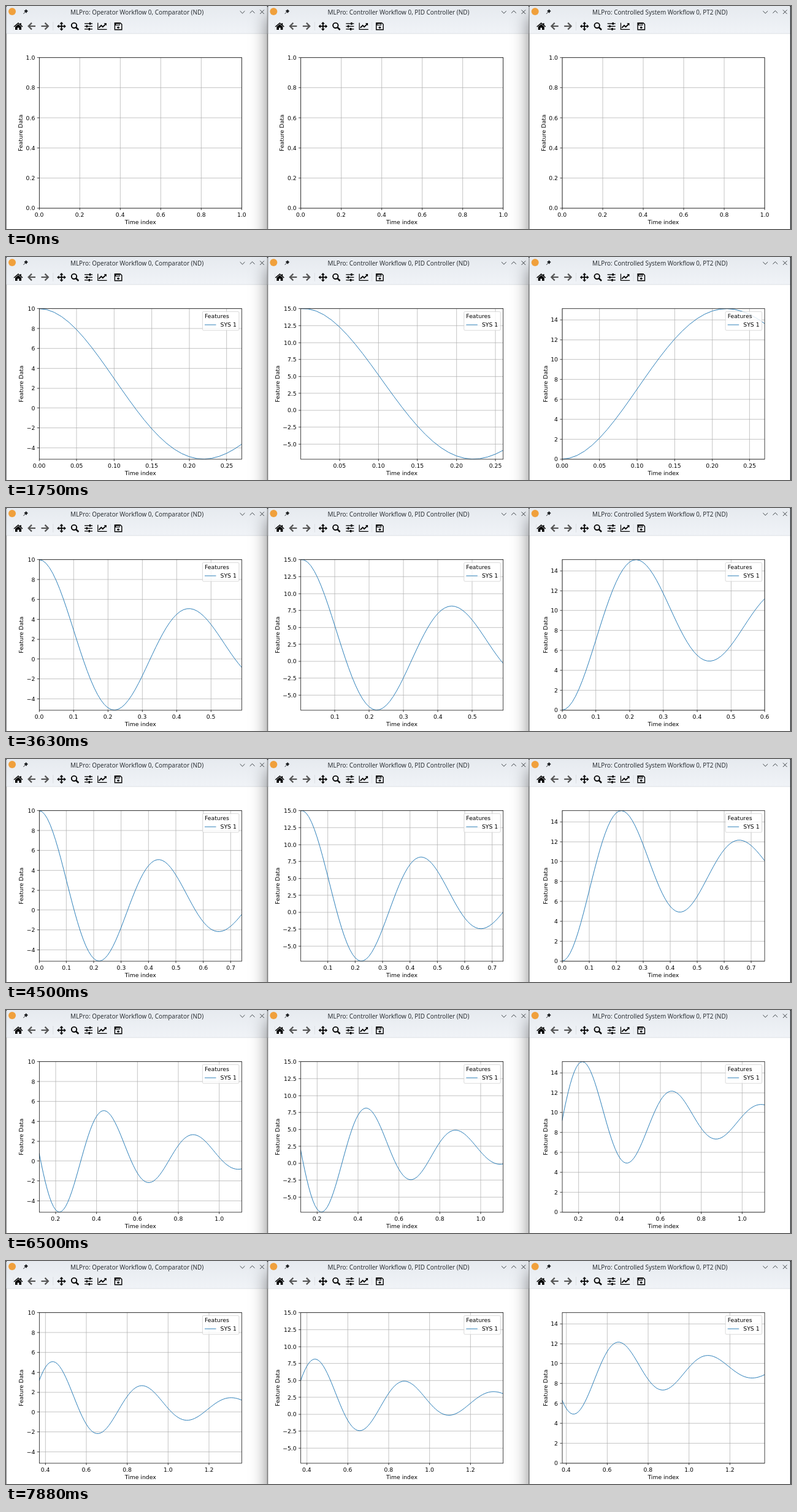
Write an HTML page with a canvas that moves like this. It is 1280 by 365 pixels and loops after 8 s.

```html
<!DOCTYPE html>
<html lang="en">
<head>
<meta charset="utf-8">
<title>Control loop</title>
<style>
  html, body { margin: 0; width: 100%; height: 100%; overflow: hidden; background: #fff; }
  canvas { display: block; }
</style>
</head>
<body>
<canvas id="stage" width="1280" height="365"></canvas>
<script>
const ctx = document.getElementById('stage').getContext('2d');
const LOOP = 8000, STEP = 125, DT = 0.01, WINDOW = 99;
const PITCH = 426.35;
const BOX = { left: 54, right: 384.4, top: 84.6, bottom: 330.7 };
const PLOT_FONT = '9.26px "DejaVu Sans", sans-serif';
const TITLE_FONT = '9.92px "Noto Sans", sans-serif';
const LINE = 0.74;

// Closed loop response: a slow offset plus a damped oscillation.
const HALF = 0.2182, OMEGA = Math.PI / HALF, SIGMA = 1.7, LAMBDA = 0.6416;
const OFFSET = 1.14, SWING = 10 - OFFSET;
const SINE = (LAMBDA * OFFSET + SIGMA * SWING) / OMEGA;

function controlError(t) {
  const wave = SWING * Math.cos(OMEGA * t) + SINE * Math.sin(OMEGA * t);
  return OFFSET * Math.exp(-LAMBDA * t) + Math.exp(-SIGMA * t) * wave;
}

const errors = [], control = [], output = [];
for (let i = 0, sum = 0; i < 150; i++) {
  const e = controlError(i * DT);
  if (i) sum += (e + errors[i - 1]) / 2 * DT;
  errors.push(e);
  control.push(1.5 * e + 1.02 * sum);
  output.push(10 - e);
}

// The three plots refresh one after another within each cycle.
const panels = [
  { title: 'MLPro: Operator Workflow 0, Comparator (ND)', data: errors, lead: 1 / 3, start: 0 },
  { title: 'MLPro: Controller Workflow 0, PID Controller (ND)', data: control, lead: 0, start: 1e-4 },
  { title: 'MLPro: Controlled System Workflow 0, PT2 (ND)', data: output, lead: 2 / 3, start: 0 }
];

// [picture step, sample reached]
const pace = [[1, 0], [2, 1.45], [8, 13.8], [21, 42.15], [36, 74.5], [44, 91.85], [52, 111.15], [63, 136.5]];

function progress(step) {
  const i = Math.max(1, pace.findIndex(p => p[0] >= step));
  const [a, from] = pace[i - 1], [b, to] = pace[i];
  return from + (to - from) * (step - a) / (b - a);
}

const snap = v => (Math.round(v * 1.5 - 0.5) + 0.5) / 1.5;

function path(points, close) {
  ctx.beginPath();
  points.forEach(([x, y], i) => i ? ctx.lineTo(x, y) : ctx.moveTo(x, y));
  if (close) ctx.closePath();
}

function stroke(points, color, width) {
  path(points);
  ctx.strokeStyle = color;
  ctx.lineWidth = width;
  ctx.stroke();
}

function fill(points, color) {
  path(points, true);
  ctx.fillStyle = color;
  ctx.fill();
}

function disc(x, y, r, color) {
  ctx.beginPath();
  ctx.arc(x, y, r, 0, 7);
  ctx.fillStyle = color;
  ctx.fill();
}

function text(str, x, y, align, font = PLOT_FONT, color = '#000') {
  ctx.font = font;
  ctx.textAlign = align;
  ctx.fillStyle = color;
  ctx.fillText(str, x, y);
}

function ticks([lo, hi]) {
  const raw = (hi - lo) / 9;
  const mag = 10 ** Math.floor(Math.log10(raw) + 1e-9);
  const base = [1, 2, 2.5, 5, 10].find(s => s * mag >= raw * (1 - 1e-9));
  const size = base * mag;
  let digits = 0;
  while (digits < 6 && Math.abs(size * 10 ** digits - Math.round(size * 10 ** digits)) > 1e-6) digits++;
  const list = [];
  for (let i = Math.ceil(lo / size - 1e-6); i * size <= hi + size * 1e-6; i++) {
    const value = i * size;
    list.push({ value, label: (value < 0 ? '\u2212' : '') + Math.abs(value).toFixed(digits) });
  }
  return list;
}

function limits(lo, hi) {
  if (hi > lo) return [lo, hi];
  const pad = 0.05 * Math.abs(lo) || 0.05;
  return [lo - pad, hi + pad];
}

function drawLegend() {
  ctx.beginPath();
  ctx.roundRect(320.4, 89.3, 59.5, 30.8, 1.85);
  ctx.fillStyle = 'rgba(255,255,255,.8)';
  ctx.fill();
  ctx.strokeStyle = 'rgba(204,204,204,.8)';
  ctx.lineWidth = 0.93;
  ctx.stroke();
  text('Features', 324, 100.2, 'left');
  stroke([[324, 111], [342.5, 111]], '#1f77b4', 0.93);
  text('SYS 1', 349.6, 114.3, 'left');
}

function drawPlot(panel, count) {
  const { left, right, top, bottom } = BOX;
  const filled = count >= 0;
  const first = Math.max(0, count - WINDOW);
  const seen = panel.data.slice(0, count + 1);
  const xLim = filled ? limits(first * DT + (first ? 0 : count ? panel.start : 0), count * DT) : [0, 1];
  const yLim = filled ? limits(Math.min(...seen), Math.max(...seen)) : [0, 1];
  const toX = v => left + (v - xLim[0]) / (xLim[1] - xLim[0]) * (right - left);
  const toY = v => bottom - (v - yLim[0]) / (yLim[1] - yLim[0]) * (bottom - top);
  const xTicks = ticks(xLim), yTicks = ticks(yLim);

  for (const { value } of xTicks) {
    const x = snap(toX(value));
    stroke([[x, top], [x, bottom]], '#b0b0b0', LINE);
  }
  for (const { value } of yTicks) {
    const y = snap(toY(value));
    stroke([[left, y], [right, y]], '#b0b0b0', LINE);
  }

  if (count > 0) {
    ctx.save();
    ctx.beginPath();
    ctx.rect(left, top, right - left, bottom - top);
    ctx.clip();
    ctx.lineJoin = 'round';
    const curve = seen.map((v, i) => [toX(i * DT), toY(v)]).slice(first);
    stroke(curve, '#1f77b4', 0.93);
    ctx.restore();
  }

  let widest = 0;
  for (const { value, label } of xTicks) {
    const x = snap(toX(value));
    stroke([[x, bottom], [x, bottom + 3.3]], '#000', LINE);
    text(label, toX(value), 344.5, 'center');
  }
  for (const { value, label } of yTicks) {
    const y = snap(toY(value));
    stroke([[left - 3.3, y], [left, y]], '#000', LINE);
    text(label, left - 6.7, toY(value) + 3.5, 'right');
    widest = Math.max(widest, ctx.measureText(label).width);
  }
  const l = snap(left), r = snap(right), t = snap(top), b = snap(bottom);
  ctx.strokeStyle = '#000';
  ctx.lineWidth = LINE;
  ctx.strokeRect(l, t, r - l, b - t);

  text('Time index', (left + right) / 2, 356.7, 'center');
  ctx.save();
  ctx.translate(left - 12.2 - widest, (top + bottom) / 2);
  ctx.rotate(-Math.PI / 2);
  text('Feature Data', 0, 0, 'center');
  ctx.restore();

  if (filled) drawLegend();
}

function drawArrow(x, dir) {
  stroke([[x - 6 * dir, 33], [x + 5 * dir, 33]], '#555', 2.2);
  stroke([[x, 27.6], [x + 5.4 * dir, 33], [x, 38.4]], '#555', 2.2);
}

function drawMoveIcon(x, y) {
  for (let i = 0; i < 4; i++) {
    ctx.save();
    ctx.translate(x, y);
    ctx.rotate(i * Math.PI / 2);
    stroke([[0, 0], [5, 0]], '#000', 1.8);
    fill([[4, -3], [7.3, 0], [4, 3]], '#000');
    ctx.restore();
  }
}

function drawToolbar() {
  for (let y = 28; y < 40; y += 2.7) disc(12, y, 0.5, '#bfc4c9');

  stroke([[13, 34], [20, 28], [27, 34]], '#000', 1.6);
  fill([[15, 34], [20, 29.8], [25, 34], [25, 39], [21.4, 39], [21.4, 35.5], [18.6, 35.5], [18.6, 39], [15, 39]], '#000');
  fill([[23, 28], [24.8, 28], [24.8, 32], [23, 30.5]], '#000');
  drawArrow(42, -1);
  drawArrow(63.5, 1);
  drawMoveIcon(90.5, 33.2);

  ctx.beginPath();
  ctx.arc(111, 31.8, 4.2, 0, 7);
  ctx.strokeStyle = '#000';
  ctx.lineWidth = 1.9;
  ctx.stroke();
  stroke([[114, 34.8], [118.3, 39]], '#000', 2.5);

  [[28.8, 137], [33.3, 131.8], [37.8, 135.8]].forEach(([y, knob]) => {
    stroke([[128, y], [141, y]], '#000', 1.3);
    stroke([[knob, y - 1.9], [knob, y + 1.9]], '#000', 2.4);
  });

  stroke([[149.8, 27.5], [149.8, 38.4], [164.5, 38.4]], '#000', 1.2);
  stroke([[151.5, 35.6], [155.3, 31.8], [157.8, 34.2], [162.3, 29.8]], '#000', 1.8);
  fill([[159.6, 28], [163.8, 28], [163.8, 32.2]], '#000');

  path([[177.4, 27.7], [186.4, 27.7], [188.8, 30.1], [188.8, 38.8], [177.4, 38.8]], true);
  ctx.lineWidth = 1.4;
  ctx.stroke();
  fill([[178, 28], [185.6, 28], [185.6, 31.8], [178, 31.8]], '#000');
  fill([[179.3, 29.3], [184.7, 29.3], [184.7, 30.7], [179.3, 30.7]], '#eef1f5');
  disc(183.1, 35.3, 1.8, '#000');
}

function drawTitleBar(title) {
  const ink = '#2b3035';
  disc(10, 9, 6, '#f0a03c');

  fill([[32.6, 5.2], [36, 8.6], [34.9, 9.1], [33.1, 11.8], [29.4, 8.1], [32.1, 6.3]], '#1d2023');
  stroke([[31.3, 9.9], [28.4, 12.8]], '#1d2023', 1);

  text(title, 213.6, 14.1, 'center', TITLE_FONT, ink);
  stroke([[381.6, 8.2], [385.5, 12], [389.4, 8.2]], ink, 0.9);
  stroke([[397.7, 11.6], [401.6, 7.8], [405.5, 11.6]], ink, 0.9);
  stroke([[414.2, 6.4], [420.8, 13]], ink, 0.9);
  stroke([[420.8, 6.4], [414.2, 13]], ink, 0.9);
}

function drawWindow(panel, index, count) {
  ctx.save();
  ctx.translate(index * PITCH, 0);

  ctx.save();
  ctx.shadowColor = 'rgba(0,0,0,.5)';
  ctx.shadowBlur = 28;
  ctx.shadowOffsetY = 18;
  ctx.beginPath();
  ctx.roundRect(0.4, 0, PITCH - 0.4, 460, 2.5);
  ctx.fillStyle = '#fff';
  ctx.fill();
  ctx.restore();

  ctx.save();
  ctx.clip();
  const head = ctx.createLinearGradient(0, 0, 0, 45);
  head.addColorStop(0, '#e6eaef');
  head.addColorStop(1, '#f0f3f7');
  ctx.fillStyle = head;
  ctx.fillRect(0, 0, PITCH, 45);
  ctx.fillStyle = '#cfd4d9';
  ctx.fillRect(0, 44.7, PITCH, 0.7);
  ctx.fillStyle = 'rgba(0,0,0,.1)';
  ctx.fillRect(76.5, 26, 0.7, 14);
  ctx.fillRect(170, 26, 0.7, 14);
  ctx.fillStyle = 'rgba(0,0,0,.4)';
  ctx.fillRect(0.4, 0, 0.7, 365);
  ctx.fillRect(PITCH - 0.6, 0, 0.6, 365);
  ctx.restore();

  drawTitleBar(panel.title);
  drawToolbar();
  drawPlot(panel, count);
  ctx.restore();
}

function draw(step) {
  ctx.fillStyle = '#22262a';
  ctx.fillRect(0, 0, 1280, 365);
  panels.forEach((panel, i) => {
    const count = step ? Math.floor(progress(step) + panel.lead) : -1;
    drawWindow(panel, i, count);
  });
}

let shown = -1;
function tick() {
  const step = Math.floor(performance.now() % LOOP / STEP);
  if (step !== shown) draw(shown = step);
  requestAnimationFrame(tick);
}
tick();
</script>
</body>
</html>
```
